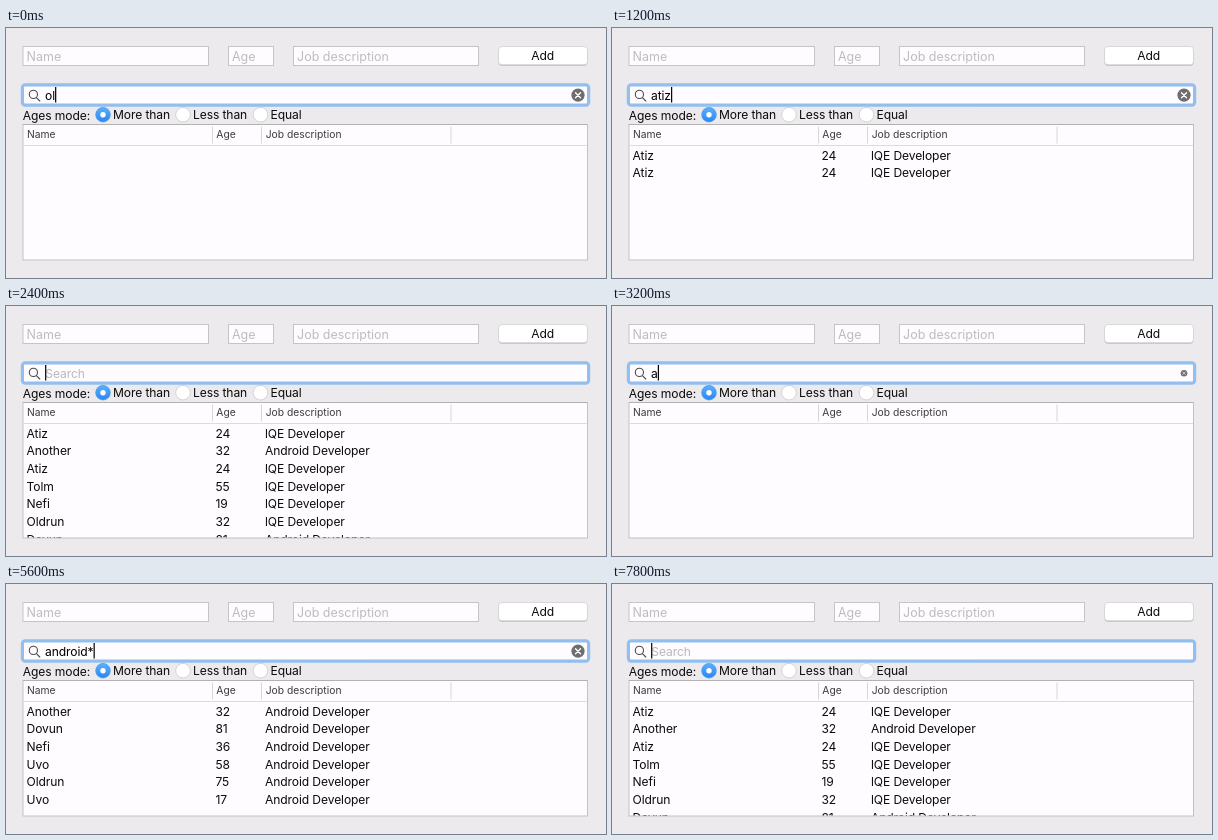
An HTML page that plays this animation: 600x250 px, repeating every 8 s.

```html
<!DOCTYPE html>
<html lang="en">
<head>
<meta charset="utf-8">
<title>Filtered table</title>
<style>
html, body { margin: 0; width: 100%; height: 100%; overflow: hidden; background: #eceaec; }
svg { display: block; width: 600px; height: 250px; }
text { font: 12.1px Inter, "Open Sans", sans-serif; letter-spacing: -.11px; fill: #0c0c0c; white-space: pre; }
.hint { font-size: 12.5px; letter-spacing: 0; fill: #bebcbf; }
.head { font-size: 10.3px; letter-spacing: 0; fill: #3c3c3c; }
#query { fill: #000; }
#placeholder { fill: #b9b8ba; }
</style>
</head>
<body>
<svg id="stage" viewBox="0 0 600 250">
  <defs>
    <clipPath id="body"><rect x="18" y="118" width="563" height="113.5"/></clipPath>
    <linearGradient id="blue" x2="0" y2="1">
      <stop stop-color="#5cb0f9"/><stop offset="1" stop-color="#2886f6"/>
    </linearGradient>
  </defs>
  <rect width="600" height="250" fill="#eceaec"/>
  <g id="form"></g>
  <rect x="492.5" y="19" width="89" height="18.7" rx="3.5" fill="#bdbcbd"/>
  <rect x="492.5" y="18.5" width="89" height="18.2" rx="3.5" fill="#fff" stroke="#d2d1d2" stroke-width=".8"/>
  <text x="536.7" y="32" text-anchor="middle">Add</text>

  <rect x="14.8" y="55.2" width="569.4" height="23.6" rx="4.5" fill="#92bfee"/>
  <rect x="18" y="58.4" width="563" height="17.2" rx="1" fill="#fefcfe"/>
  <g fill="none" stroke="#4c4c4c" stroke-width="1.1" stroke-linecap="round">
    <circle cx="27.4" cy="66.4" r="4.1"/><path d="M30.4 69.6L33.8 73"/>
  </g>
  <text id="placeholder" x="39.3" y="71.8">Search</text>
  <text id="query" x="39" y="71.8"></text>
  <rect id="caret" y="59" width="1.2" height="15.5" fill="#000"/>
  <g id="clear">
    <circle r="6.6" fill="#6e6d6f"/>
    <path d="M-2.5-2.5L2.5 2.5M2.5-2.5L-2.5 2.5" stroke="#fff" stroke-width="1.4" stroke-linecap="round"/>
  </g>

  <text x="16.8" y="92.2">Ages mode:</text>
  <g id="modes"></g>

  <rect x="17" y="96.5" width="564.5" height="135.5" fill="#fefcfe" stroke="#c3c2c3"/>
  <path d="M17 96.5H581.5" stroke="#b3b2b3"/>
  <path d="M17.5 117.5H581" stroke="#dddcdd"/>
  <path d="M206.5 98.5V115.5M255.5 98.5V115.5M445 98.5V115.5" stroke="#d8d7d8"/>
  <g id="heads"></g>
  <g id="rows" clip-path="url(#body)"></g>
</svg>
<script>
const LOOP = 8000;
const FRAME_GREY = "#c6c5c6";
const $ = id => document.getElementById(id);

function add(parent, tag, attrs, content = "") {
  const node = document.createElementNS("http://www.w3.org/2000/svg", tag);
  for (const key in attrs) node.setAttribute(key, attrs[key]);
  node.textContent = content;
  return parent.appendChild(node);
}

const android = "Android Developer", mobile = "lQE Developer";
const people = [
  ["Atiz", 24, mobile], ["Another", 32, android], ["Atiz", 24, mobile],
  ["Tolm", 55, mobile], ["Nefi", 19, mobile], ["Oldrun", 32, mobile],
  ["Dovun", 81, android], ["Nefi", 36, android], ["Uvo", 58, android],
  ["Oldrun", 75, android], ["Uvo", 17, android]
];

// [start ms, query, caret shown, clear button scale]
const steps = [
  [0, "ol", 1, 1], [200, "o", 1, 1], [600, "", 1, 0],
  [800, "a", 1, .5], [1000, "ati", 1, 1], [1200, "atiz", 1, 1],
  [1800, "ati", 1, 1], [2000, "at", 1, 1], [2200, "a", 1, 1], [2400, "", 1, 0],
  [3000, "", 0, 0], [3200, "a", 1, .5], [3400, "an", 1, 1],
  [3800, "and", 1, 1], [4000, "andr", 1, 1], [4600, "andr", 0, 1],
  [4800, "andro", 1, 1], [5000, "androi", 1, 1], [5200, "android", 1, 1],
  [5600, "android*", 1, 1], [6000, "android*", 0, 1], [6600, "android*", 1, 1],
  [7000, "android*", 0, 1], [7200, "android*", 1, 1], [7400, "android*", 0, 1],
  [7800, "", 1, 0]
];

// A query matches a whole field, or its beginning when it ends in "*".
function matches(person, query) {
  if (!query) return true;
  return person.some(field => {
    const value = String(field).toLowerCase();
    return query.endsWith("*") ? value.startsWith(query.slice(0, -1)) : value === query;
  });
}

function buildStatic() {
  for (const [x, width, label] of [[17, 185.5, "Name"], [222.5, 45, "Age"], [287.5, 185, "Job description"]]) {
    add($("form"), "rect", { x, y: 18.5, width, height: 19, fill: "#fefcfe", stroke: FRAME_GREY });
    add($("form"), "text", { x: x + 3.5, y: 33, class: "hint" }, label);
  }
  [[97, "More than"], [177, "Less than"], [254.5, "Equal"]].forEach(([cx, label], i) => {
    add($("modes"), "circle", { cx, cy: 86.7, r: 7.3, fill: i ? "#fff" : "url(#blue)", stroke: i ? FRAME_GREY : "#3f96ee", "stroke-width": .7 });
    if (!i) add($("modes"), "circle", { cx, cy: 86.7, r: 2.7, fill: "#fff" });
    add($("modes"), "text", { x: cx + 10, y: 91.3 }, label);
  });
  for (const [x, label] of [[21, "Name"], [210.3, "Age"], [259.7, "Job description"]])
    add($("heads"), "text", { x, y: 110.2, class: "head" }, label);
}

function drawRows(query) {
  $("rows").textContent = "";
  people.filter(person => matches(person, query)).slice(0, 7).forEach((person, row) => {
    person.forEach((value, col) =>
      add($("rows"), "text", { x: [20.6, 209.4, 259][col], y: 131.6 + row * 17.72 }, value));
  });
}

let current;
function render(time) {
  const step = steps.findLast(([start]) => start <= time % LOOP);
  if (step === current) return;
  current = step;
  const [, query, caret, scale] = step;
  $("query").textContent = query;
  $("placeholder").style.display = query ? "none" : "";
  $("caret").style.display = caret ? "" : "none";
  $("caret").setAttribute("x", 39.1 + (query ? $("query").getComputedTextLength() : 0));
  $("clear").setAttribute("transform", `translate(572 67.2) scale(${scale})`);
  drawRows(query);
}

buildStatic();
const origin = performance.now();
function tick() {
  render(performance.now() - origin);
  requestAnimationFrame(tick);
}
tick();
</script>
</body>
</html>
```
